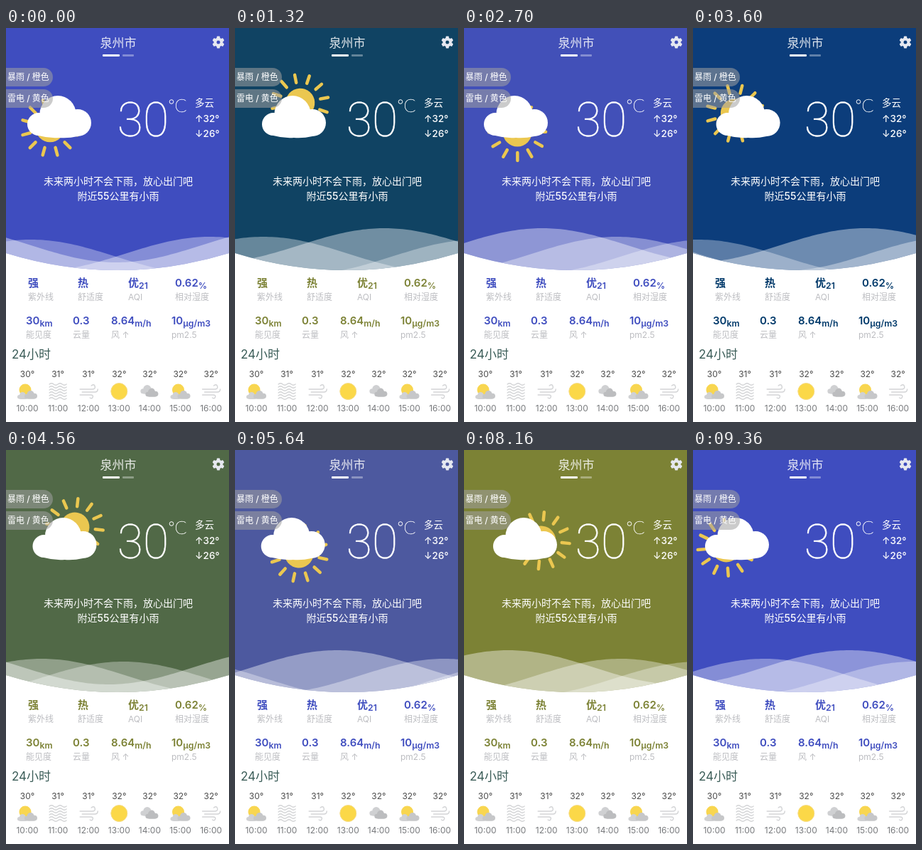
An HTML page for the animation above (9420 ms loop, 314 by 553 pixels).

```html
<!DOCTYPE html>
<html lang="zh">
<head>
<meta charset="utf-8">
<style>
  html, body { margin: 0; width: 100%; height: 100%; overflow: hidden; background: #fff; }
  svg { display: block; width: 314px; height: 553px; font-family: Inter, "Noto Sans CJK SC", "Noto Sans CJK", sans-serif; }
  .white { fill: #fff; font-weight: 500; }
  .label { fill: #bcbdc1; font-size: 12px; }
  .value { font-size: 15px; font-weight: 600; }
  .unit { font-size: 12.3px; }
  .mid { text-anchor: middle; }
  .thin { font-family: Roboto, "Noto Sans", sans-serif; font-weight: 100; fill: #fff; stroke: #fff; stroke-width: .5; }
  .round { font-family: Lato, sans-serif; }
  .gray { fill: none; stroke: #d3d4d6; stroke-width: 1.4; stroke-linecap: round; }
</style>
</head>
<body>
<svg viewBox="0 0 314 553">
  <defs>
    <clipPath id="bowl"><path d="M0 0H314V316Q157 364 0 316Z"/></clipPath>
    <g id="cloud">
      <circle cx="16" cy="40" r="16"/>
      <circle cx="43" cy="25.5" r="25.5"/>
      <circle cx="71" cy="38" r="19"/>
      <path d="M16 30H71V57Q58 60 45 59Q30 60 16 56Z"/>
    </g>
    <g id="sun"></g>
    <g id="partly">
      <circle cx="-3" cy="-2" r="8.5" fill="#f8d650"/>
      <use href="#cloud" fill="#d0d1d3" transform="translate(-14 1) scale(.17)"/>
      <use href="#cloud" fill="#c6c7c9" transform="translate(-4 -1) scale(.2)"/>
    </g>
    <g id="fog" class="gray"></g>
    <path id="wind" class="gray" d="M-12 -3H5q5 0 4-4t-5-1M-9 1H9q4 0 4-4M-12 5H3q4 0 3 3t-4 1"/>
    <circle id="bright" r="11.5" fill="#fbd848" stroke="#f6dc85"/>
    <g id="cloudy">
      <use href="#cloud" fill="#cfd0d2" transform="translate(-13 -9) scale(.22)"/>
      <use href="#cloud" fill="#bcbdbf" transform="translate(-6 -4) scale(.2)"/>
    </g>
  </defs>

  <g clip-path="url(#bowl)">
    <rect id="sky" width="314" height="345"/>
    <g id="waves" fill="#fff"></g>
  </g>
  <use id="bigSun" href="#sun"/>
  <use id="bigCloud" href="#cloud" fill="#fff"/>

  <text class="mid" x="158" y="27" font-size="17" fill="#fff" fill-opacity=".87">泉州市</text>
  <rect x="136" y="37" width="24" height="3" rx="1" fill="#fff"/>
  <rect x="164" y="37" width="16" height="3" rx="1" fill="#fff" fill-opacity=".35"/>
  <g id="gear" transform="translate(299 20)" fill="#e6e8f0"></g>

  <g fill="#a0a0a0" fill-opacity=".55">
    <path d="M0 56H53a13 13 0 0 1 0 26H0Z"/>
    <path d="M0 86H53a13 13 0 0 1 0 26H0Z"/>
  </g>
  <g class="white" font-size="12">
    <text x="2" y="73">暴雨 / 橙色</text>
    <text x="2" y="103">雷电 / 黄色</text>
  </g>

  <text class="thin mid" x="193" y="152" font-size="66">30</text>
  <circle cx="233" cy="103.5" r="2.8" fill="none" stroke="#fff"/>
  <text class="thin round" x="237.5" y="118" font-size="25">C</text>
  <g class="white" font-size="13.5">
    <text x="266" y="110">多云</text>
    <text x="266" y="132">↑32°</text>
    <text x="266" y="153">↓26°</text>
  </g>
  <g class="white mid" font-size="14">
    <text x="158" y="220">未来两小时不会下雨，放心出门吧</text>
    <text x="158" y="241">附近55公里有小雨</text>
  </g>

  <g id="metrics"></g>
  <text x="8" y="464" font-size="17" fill="#3a5c57">24小时</text>
  <g id="hours" class="mid"></g>
</svg>

<script>
const $ = id => document.getElementById(id);
const LOOP = 9420, STEP = 1030, FADE = 580, WAVELENGTH = 480;
const themes = [[63, 77, 191], [0, 57, 106], [124, 130, 53]]; // indigo, navy, olive
const rgb = c => `rgb(${c.map(Math.round)})`;
const repeat = (n, make) => Array.from({ length: n }, (_, i) => make(i)).join('');

$('sun').innerHTML = '<circle r="20.5" fill="#ebc750"/>' + repeat(12, i =>
  `<path d="M29 0H40" transform="rotate(${i * 30})" stroke="#ebc750" stroke-width="4.5" stroke-linecap="round"/>`);
$('fog').innerHTML = repeat(6, i =>
  `<path d="M-12 ${i * 4 - 10}q3-2.5 6 0t6 0t6 0t6 0"/>`);
$('gear').innerHTML = repeat(6, i =>
  `<rect x="-2.2" y="-8.5" width="4.4" height="6" rx="1" transform="rotate(${i * 60})"/>`) +
  '<circle r="4.6" fill="none" stroke="#e6e8f0" stroke-width="3.8"/>';

$('metrics').innerHTML = [
  [31, 363, '强', '', '紫外线'], [101, 363, '热', '', '舒适度'],
  [172, 363, '优', '21', 'AQI'], [238, 363, '0.62', '%', '相对湿度'],
  [28, 416, '30', 'km', '能见度'], [94, 416, '0.3', '', '云量'],
  [148, 416, '8.64', 'm/h', '风 ↑'], [233, 416, '10', 'μg/m3', 'pm2.5']
].map(([x, y, value, unit, label]) =>
  `<text class="value" x="${x}" y="${y}">${value}<tspan class="unit" dy="3">${unit}</tspan></text>
   <text class="label" x="${x}" y="${y + 19}">${label}</text>`).join('');

const icons = ['partly', 'fog', 'wind', 'bright', 'cloudy', 'partly', 'wind'];
const degrees = [30, 31, 31, 32, 32, 32, 32];
$('hours').innerHTML = icons.map((icon, i) => {
  const x = 30 + i * 43.1;
  return `<text x="${x}" y="490" font-size="12" fill="#4c4c4c">${degrees[i]}°</text>
    <use href="#${icon}" x="${x}" y="510"/>
    <text x="${x}" y="538" font-size="12" fill="#77797c">${10 + i}:00</text>`;
}).join('');

// Piecewise motion through a few poses
const times = [0, 1320, 2700, 4560, 6660, 8160, 9360];
function along(values, t) {
  let i = 0;
  while (i < times.length - 2 && t > times[i + 1]) i++;
  const p = (t - times[i]) / (times[i + 1] - times[i]);
  return values[i] + (values[i + 1] - values[i]) * p;
}
const cloudPath = [30, 38, 28, 37.5, 36, 41, 17];
const waves = [
  { top: 281, alpha: .4, path: [-85, 210, 590, 864, 1330, 1502, 1660] },
  { top: 293, alpha: .36, path: [287, 520, 695, 1010, 1485, 1660, 2020] },
  { top: 297, alpha: .32, path: [35, 340, 820, 1125, 1590, 1770, 2230] }
];
$('waves').innerHTML = waves.map(w => `<path fill-opacity="${w.alpha}"/>`).join('');

function waveShape(top, peak) {
  let d = 'M0 350';
  for (let x = 0; x <= 316; x += 4) {
    const y = top + 24 * (1 - Math.cos((x - peak) / WAVELENGTH * 2 * Math.PI));
    d += `L${x} ${y.toFixed(2)}`;
  }
  return d + 'V350Z';
}

// The CSS "ease" curve
function ease(x) {
  if (x >= 1) return 1;
  const curve = (s, a, b) => 3 * s * (1 - s) ** 2 * a + 3 * s * s * (1 - s) * b + s ** 3;
  let low = 0, high = 1;
  for (let i = 0; i < 16; i++) {
    const s = (low + high) / 2;
    if (curve(s, .25, .25) < x) low = s; else high = s;
  }
  return curve(low, .1, 1);
}

function draw(t) {
  const clock = t + 810, index = Math.floor(clock / STEP);
  const to = themes[index % 3], from = themes[(index + 2) % 3];
  const mix = ease((clock % STEP) / FADE);
  $('sky').setAttribute('fill', rgb(from.map((c, i) => c + (to[i] - c) * mix)));
  $('metrics').setAttribute('fill', rgb(to));

  waves.forEach((w, i) => $('waves').children[i].setAttribute('d', waveShape(w.top, along(w.path, t))));

  const left = along(cloudPath, t), turn = 135 + t * .1165, angle = turn * Math.PI / 180;
  const x = left + 47 + 21 * Math.cos(angle), y = 125 + 21 * Math.sin(angle);
  $('bigSun').setAttribute('transform', `translate(${x} ${y}) rotate(${turn})`);
  $('bigCloud').setAttribute('transform', `translate(${left} 95)`);
}

const start = performance.now();
function frame() {
  draw((performance.now() - start) % LOOP);
  requestAnimationFrame(frame);
}
frame();
</script>
</body>
</html>
```
